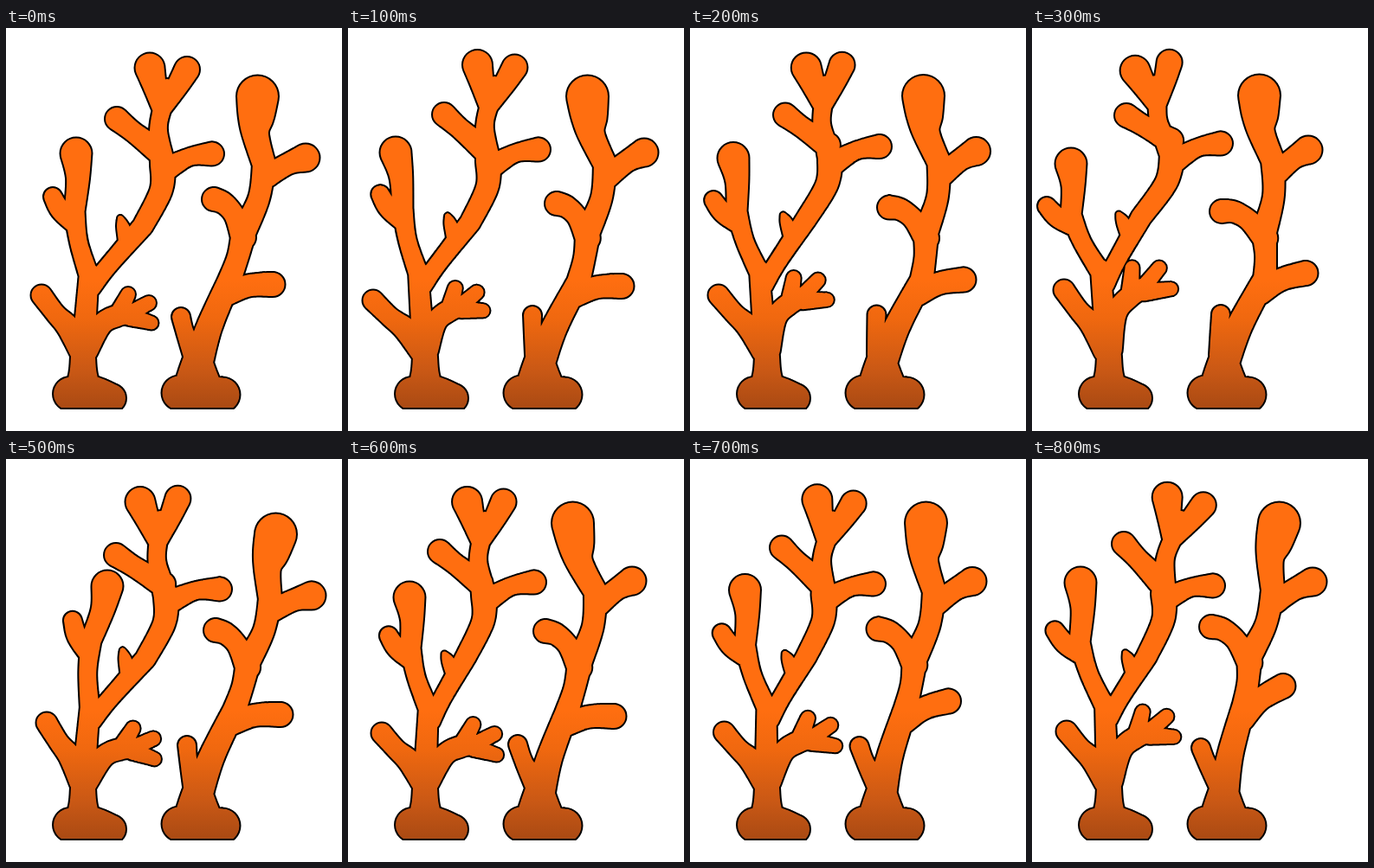
An HTML page with a canvas for the animation above (900 ms loop, 388 by 466 pixels).

```html
<!DOCTYPE html>
<html lang="en">
<head>
<meta charset="utf-8">
<title>Swaying coral</title>
<style>
  html, body { margin: 0; width: 100%; height: 100%; overflow: hidden; background: #fff; }
  canvas { display: block; }
</style>
</head>
<body>
<canvas id="stage" width="388" height="466"></canvas>
<script>
const STEP = 100;
const GROUND = 440;
// Pose shown at each step; a half lies midway between two poses.
const TIMELINE = [0, 1, 1.5, 2, 2.5, 3, 4, 4.5, 5];

const limbs = [];
const parse = text => text.split(' ').map(item => item.split(',').map(Number));

// spine: x,y,radius from base to tip at rest. drift: how far the tip has swayed in poses 1 to 5.
// A limb without drift moves along with its parent.
function grow(parent, spine, drift) {
  const limb = { parent, spine: parse(spine), drift: drift && parse('0,0 ' + drift) };
  limbs.push(limb);
  return limb;
}

// Left coral
grow(null, '74,423,20 97,420,19 122,428,17');
grow(null, '89,428,24 89,402,17 89,380,15');
const trunk = grow(null, '89,385,15 92,335,13 96,283,12', '-15,-2 -17,-4 1,3 -3,3 -12,0');
grow(trunk, '89,372,17 72,346,14 57,330,12 41,309,12.5', '-12,6 -4,-6 6,-4 -2,8 -1,6');

const frond = grow(trunk, '96,287,12 84,248,11 79,212,12.5', '-16,-3 -34,4 19,-2 -7,7 -24,0');
grow(frond, '80,228,11 63,211,12 54,195,11');
grow(frond, '79,212,12.5 83,174,14 81,145,18.5', '-26,-1 -36,12 36,2 -10,15 -25,-2');

const stem = grow(trunk, '98,300,12 119,274,11 158,229,12.5', '-17,-4 -32,-10 3,2 -22,0 -26,0');
grow(stem, '139,247,10 135,230,8 132,220,4');
const shoulder = grow(stem, '158,229,12.5 179,188,13.5 181,158,15', '-19,-3 -19,-11 4,2 -24,0 -29,-2');
grow(shoulder, '177,143,15 148,121,12.5 128,105,14', '-17,-5 -19,-4 -1,6 -22,2 -22,-7');
grow(shoulder, '185,163,14 212,149,11 238,145.5,14', '-18,-5 -20,-12 9,5 -23,-3 -29,1');
const crown = grow(shoulder, '181,158,15 176,118,11 181,90,11 186,68,10', '-17,-3 -43,-4 -8,1 -28,2 -14,1');
grow(crown, '180,95,11 172,68,14 166,46,17.5');
grow(crown, '182,93,10 198,67,13 209,48,15');

const branch = grow(trunk, '91,372,16 110,343,13 128,333,13 145,330,12', '-13,-9 -15,-30 4,4 3,0 -8,-15');
grow(branch, '130,330,11 141,308,9');
grow(branch, '145,329,10 165,318,9');
grow(branch, '143,334,11 168,341,8.5');

// Right coral
grow(null, '200,422,20.5 250,424,20.5');
grow(null, '222,428,32 221,404,24 221,386,18');
const trunk2 = grow(null, '221,390,18 235,345,15.5 258,292,14', '8,2 11,-2 6,-2 -5,0 -13,-8');
grow(null, '220,378,16 208,355,11 202,334,11', '11,-2 16,-3 7,-3 -6,-4 -7,0');
grow(trunk2, '254,308,14 280,298,13.5 308,296.5,14.5', '8,2 8,-13 9,-1 -1,1 -18,-34');
const waist = grow(trunk2, '258,292,14 268,264,13 275,234,15', '2,1 -7,2 5,-1 -7,-1 -24,-6');
grow(waist, '274,242,15 264,217,12.5 252,203,13 240,198,14', '1,5 -21,14 2,0 -12,1 -33,-4');
const shoulder2 = grow(waist, '275,234,15 292,197,13 298,158,14', '-1,0 -20,-5 7,4 -12,-4 -20,-6');
grow(shoulder2, '298,158,14 288,122,16 289,100,21.5 290.5,79,24.5', '-14,0 -28,-1 21,8 -31,-5 -5,-5');
grow(shoulder2, '300,172,14 326,157,13 346,150,16.5', '-4,-6 -27,-9 7,8 -18,-9 -22,-8');

const lerp = (a, b, k) => a + (b - a) * k;

function driftAt(limb, pose) {
  const from = limb.drift[Math.floor(pose)], to = limb.drift[Math.ceil(pose)];
  return from.map((v, axis) => lerp(v, to[axis], pose % 1));
}

// The turn and stretch that carry a limb from rest into a pose, as a function on points.
function frameOf(limb, pose) {
  const carry = limb.parent ? frameOf(limb.parent, pose) : (x, y) => [x, y];
  if (!limb.drift) return carry;
  const [bx, by] = limb.spine[0], [tx, ty] = limb.spine.at(-1);
  const [baseX, baseY] = carry(bx, by), [dx, dy] = driftAt(limb, pose);
  const rx = tx - bx, ry = ty - by, sx = tx + dx - baseX, sy = ty + dy - baseY;
  const square = rx * rx + ry * ry;
  const cos = (rx * sx + ry * sy) / square, sin = (rx * sy - ry * sx) / square;
  return (x, y) => [
    baseX + cos * (x - bx) - sin * (y - by),
    baseY + sin * (x - bx) + cos * (y - by)
  ];
}

// Catmull-Rom interpolation of position and radius along a spine.
function alongSpine(spine, samples = 40) {
  const at = i => spine[Math.max(0, Math.min(spine.length - 1, i))];
  const discs = [];
  for (let n = 0; n <= (spine.length - 1) * samples; n++) {
    const i = Math.floor(n / samples), u = n / samples - i;
    const [a, b, c, d] = [-1, 0, 1, 2].map(offset => at(i + offset));
    discs.push(b.map((v, k) => v + u / 2 * (c[k] - a[k] +
      u * (2 * a[k] - 5 * v + 4 * c[k] - d[k] + u * (3 * (v - c[k]) + d[k] - a[k])))));
  }
  return discs;
}

const ctx = document.getElementById('stage').getContext('2d');
const shade = ctx.createLinearGradient(0, 290, 0, 442);
['#ff6e10', '#f0680f', '#c95815', '#a84913'].forEach((color, i) =>
  shade.addColorStop([0, .3, .7, 1][i], color));

// Fills every limb as a run of discs, grown or shrunk by a margin and cut off at the ground.
function fillCorals(pose, margin, color) {
  ctx.save();
  ctx.beginPath();
  ctx.rect(0, 0, 388, GROUND + margin);
  ctx.clip();
  ctx.beginPath();
  for (const limb of limbs) {
    const carry = frameOf(limb, pose);
    for (const [restX, restY, radius] of alongSpine(limb.spine)) {
      const [x, y] = carry(restX, restY), r = radius + margin;
      ctx.moveTo(x + r, y);
      ctx.arc(x, y, r, 0, 2 * Math.PI);
    }
  }
  ctx.fillStyle = color;
  ctx.fill();
  ctx.restore();
}

let shown;
function draw() {
  const step = Math.floor(performance.now() / STEP) % TIMELINE.length;
  if (step !== shown) {
    shown = step;
    ctx.clearRect(0, 0, 388, 466);
    fillCorals(TIMELINE[step], 1, '#000');
    fillCorals(TIMELINE[step], -1, shade);
  }
  requestAnimationFrame(draw);
}
draw();
</script>
</body>
</html>
```
